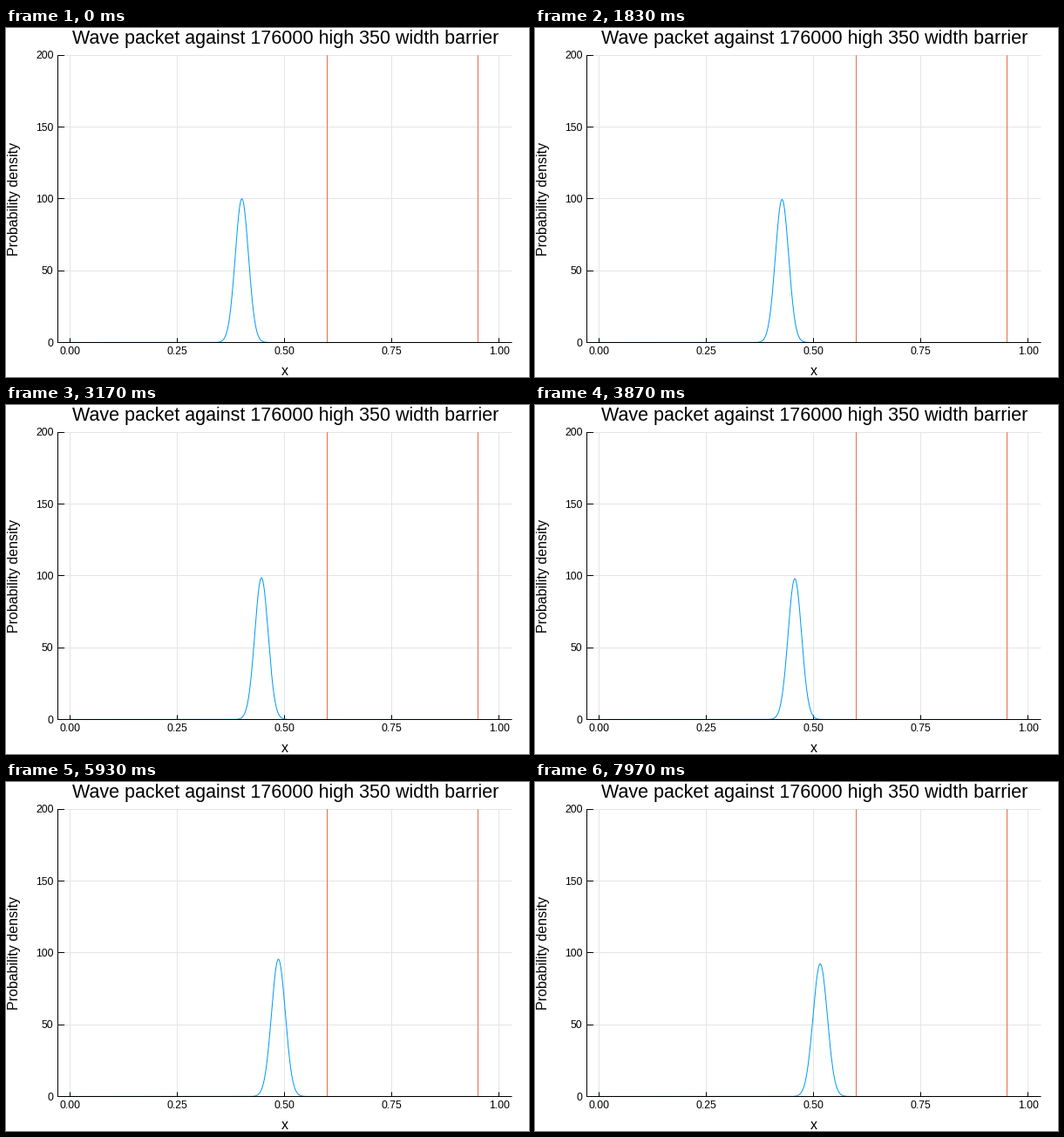
Write a matplotlib script that moves like this. It is 600 by 400 pixels and loops after 8000 ms.

```python
import math

import numpy as np
import matplotlib.pyplot as plt
from matplotlib.animation import FuncAnimation

W, H, DPI = 600, 400, 100
LOOP, FRAMES = 8000, 240
STEP = LOOP / FRAMES

# Axes box in pixels, y downwards
LEFT, RIGHT, TOP, BOTTOM = 59.1, 580.5, 31.2, 360.4
X_LIM, Y_LIM = (-0.03, 1.03), (0, 200)

START, SPEED = 0.4, 1.444e-5      # position, units per ms
SIGMA, SPREAD = 0.0154, 19135     # initial width, dispersion time in ms

plt.rcParams["font.family"] = "Liberation Sans"


def px(size):
    return size * 72 / DPI


def mid(v):
    """Centre of the pixel that holds v."""
    return math.floor(v) + 0.5


def to_x(v):
    return LEFT + (v - X_LIM[0]) / (X_LIM[1] - X_LIM[0]) * (RIGHT - LEFT)


def to_y(v):
    return BOTTOM - v / Y_LIM[1] * (BOTTOM - TOP)


fig = plt.figure(figsize=(W / DPI, H / DPI), dpi=DPI, facecolor="white")
ax = fig.add_axes([0, 0, 1, 1])
ax.set(xlim=(0, W), ylim=(H, 0))
ax.axis("off")


def line(xs, ys, color, z=1):
    return ax.plot(xs, ys, color=color, lw=px(1), zorder=z, snap=False,
                   solid_capstyle="butt")[0]


def vline(x, y0, y1, color, z=1):
    line([mid(x)] * 2, [y0, y1], color, z)


def hline(y, x0, x1, color, z=1):
    line([x0, x1], [mid(y)] * 2, color, z)


def label(x, y, text, size, **kw):
    ax.text(x, y, text, fontsize=px(size), color="black", **kw)


for v in (0, 0.25, 0.5, 0.75, 1):
    x = to_x(v)
    vline(x, TOP, BOTTOM, "#e5e5e5")
    vline(x, BOTTOM, BOTTOM - 5, "black", 2)
    label(x, 374, f"{v:.2f}", 12.3, ha="center", va="baseline")

for v in range(0, 201, 50):
    y = to_y(v)
    hline(y, LEFT, RIGHT, "#e5e5e5")
    hline(y, LEFT, LEFT + 8, "black", 2)
    label(54.5, y + 4.2, str(v), 12.3, ha="right", va="baseline")

hline(BOTTOM, LEFT, RIGHT, "black", 4)
vline(LEFT, TOP, mid(BOTTOM) + 0.5, "black", 4)

for v in (0.6, 0.95):
    vline(to_x(v), TOP, BOTTOM, "#e26f46", 3)

label(320.5, 18, "Wave packet against 176000 high 350 width barrier", 21.55,
      ha="center", va="baseline")
label(320, 398, "x", 16, ha="center", va="baseline")
label(17, 196, "Probability density", 16, ha="right", va="center",
      rotation=90)

grid = np.linspace(0, 0.95, 1901)
packet = line([], [], "#009af9", 3.5)


def draw(i):
    t = i * STEP
    grow = 1 + (t / SPREAD) ** 2
    d = grid - START - SPEED * t
    density = 100 / np.sqrt(grow) * np.exp(-d ** 2 / (2 * SIGMA ** 2 * grow))
    packet.set_data(to_x(grid), to_y(density))
    return packet,


anim = FuncAnimation(fig, draw, frames=FRAMES, interval=STEP, repeat=True,
                     repeat_delay=0, blit=False)
plt.show()
```
